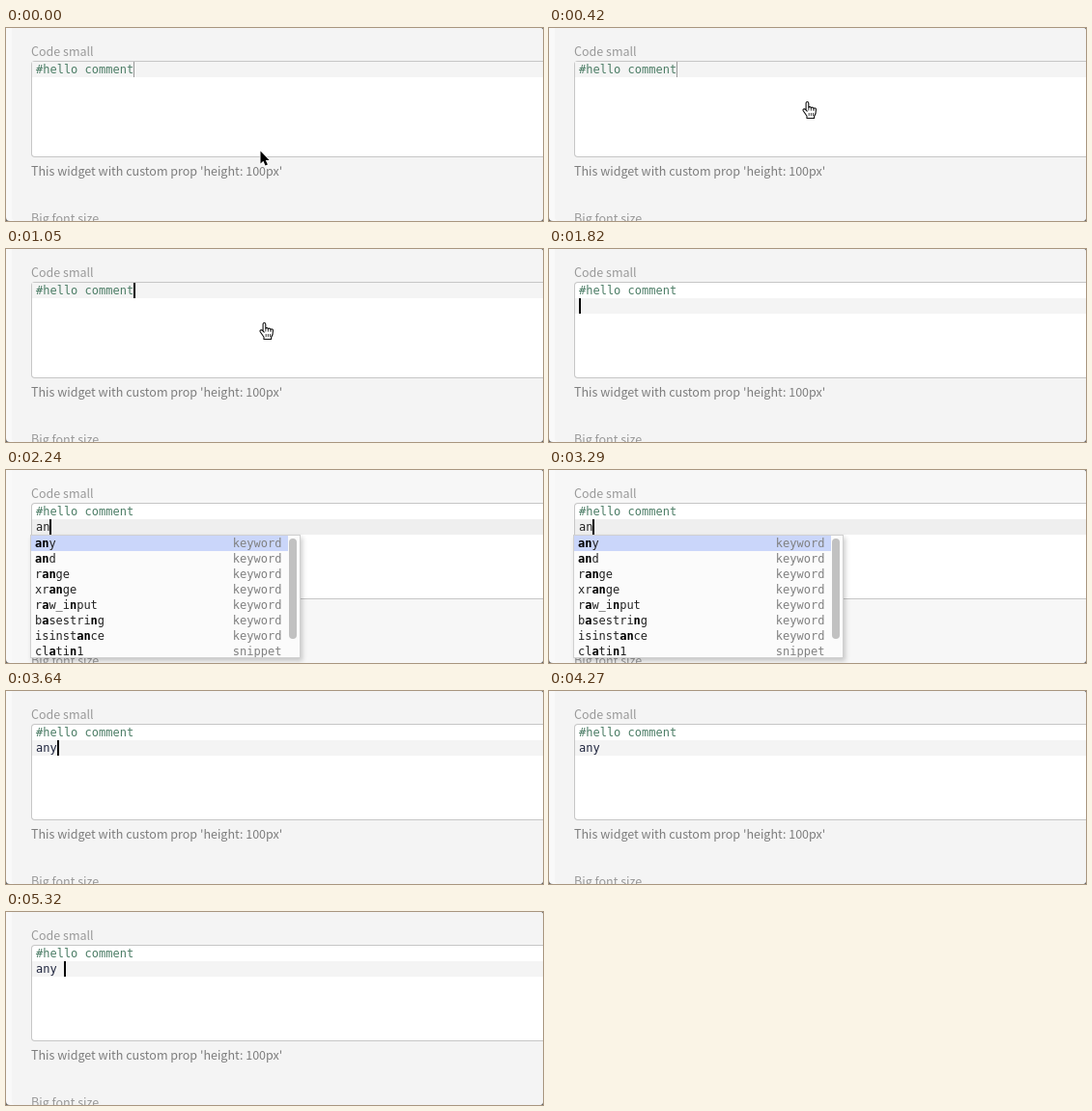
Animation, 556 px wide and 200 px high, one loop 5530 ms. Source, as an HTML page with a canvas:

```html
<!DOCTYPE html>
<html lang="en">
<head>
<meta charset="utf-8">
<title>Code editor with completion</title>
<style>
  html, body { margin: 0; width: 100%; height: 100%; overflow: hidden; background: #f4f4f4; }
  canvas { display: block; width: 556px; height: 200px; }
</style>
</head>
<body>
<canvas id="stage" width="556" height="200"></canvas>
<script>
const ctx = document.getElementById('stage').getContext('2d');
const W = 556, H = 200, LOOP = 5530, TICK = 70;
const SANS = '12.53px "Noto Sans CJK JP", "Noto Sans CJK SC", "Noto Sans CJK", "Open Sans", sans-serif';
const MONO = '12px "DejaVu Sans Mono", monospace';
const CHAR = 7.2, ROW = 16;

// Key times in ms
const CLICK = 490, ENTER = 1330, TYPE_A = 1960, TYPE_N = 2100, ACCEPT = 3640, SPACE = 4900;

const SHORT_LIST = ['as', 'abs', 'all', 'and', 'any', 'apply', 'assert', 'clatin1'];
const LONG_LIST = ['any', 'and', 'range', 'xrange', 'raw_input', 'basestring', 'isinstance', 'clatin1'];

const ARROW = new Path2D('M.5 .5V13.5L3.4 10.8L5.5 15.6L7.9 14.5L5.8 9.9H9.6Z');
const HAND = new Path2D('M5.2 10.2L3.6 8.5C2.3 7.3.4 8.2 1.2 9.7L5 15.2V17.5H12.6V15.6' +
  'C14 13.6 14.5 12 14.5 8.4C14.5 6.6 12.2 6.4 12 8C12 5.8 9.6 5.6 9.4 7.2' +
  'C9.3 5.3 7 5.2 6.8 6.6V2C6.7 0 4.1 0 4.1 2V9Z');
const KNUCKLES = new Path2D('M6.8 6.6V9.5M9.4 7.2V9.7M12 8V10M7.2 12V15M9.4 12V15M11.5 12V15');

const between = (t, a, b) => t >= a && t < b;
const mix = (a, b, k) => a + (b - a) * k;
const ease = k => k * k * (3 - 2 * k);

function box(x, y, w, h, fill) {
  ctx.fillStyle = fill;
  ctx.fillRect(x, y, w, h);
}

function rounded(x, y, w, h, r, fill) {
  ctx.beginPath();
  ctx.roundRect(x, y, w, h, r);
  ctx.fillStyle = fill;
  ctx.fill();
}

function text(str, x, y, font, fill) {
  ctx.font = font;
  ctx.fillStyle = fill;
  ctx.fillText(str, x, y);
}

function drawPage(open) {
  box(0, 0, W, H, '#666');
  rounded(0, 0, W, H, [0, 3, 4, 4], '#f9f9f9');
  rounded(6, 0, W - 6, H, [0, 3, 4, 4], open ? '#f7f7f7' : '#f4f4f4');
  text('Code small', 26, 29, SANS, '#999');
  text("This widget with custom prop 'height: 100px'", 26, 153, SANS, '#7d7d7d');
  text('Big font size', 26, 202, SANS, '#999');
}

function drawEditor(t) {
  const line = t < ENTER ? 0 : 1;
  rounded(26, 34, W, 100, 4, '#c6c6c6');
  rounded(27, 35, W, 98, 3, '#fff');
  box(27, 35 + line * ROW, W, ROW, between(t, TYPE_A, ACCEPT) ? '#efefef' : '#f4f4f4');
  text('#hello comment', 31, 47, MONO, '#4c7d66');
  const word = t < TYPE_A ? '' : t < TYPE_N ? 'a' : t < ACCEPT ? 'an' : 'any';
  text(word, 31, 63, MONO, t < ACCEPT ? '#222' : '#20263f');
}

function drawCaret(t) {
  if (t < CLICK) return box(132, 35, 1, ROW, '#999');
  const off = between(t, 1120, ENTER) || between(t, 2800, 3290) || between(t, 4270, 4690);
  if (off) return;
  const column = t < ENTER ? 14 : t < TYPE_A ? 0 : t < TYPE_N ? 1 : t < ACCEPT ? 2 : t < SPACE ? 3 : 4;
  box(Math.round(31 + column * CHAR), t < ENTER ? 35 : 51, 2, ROW, '#000');
}

// Letters of the typed prefix are bold, matched in order.
function drawItem(word, prefix, y) {
  let hit = 0;
  [...word].forEach((c, i) => {
    const match = c === prefix[hit];
    if (match) hit++;
    text(c, 30 + i * CHAR, y, (match ? 'bold ' : '') + MONO, match ? '#000' : '#222');
  });
  const kind = word === 'clatin1' ? 'snippet' : 'keyword';
  text(kind, 234.8, y, MONO, '#808080');
}

function drawPopup(t) {
  const filtered = t >= TYPE_N;
  ctx.save();
  ctx.shadowColor = 'rgba(0,0,0,.2)';
  ctx.shadowBlur = 5;
  ctx.shadowOffsetX = 2;
  ctx.shadowOffsetY = 3;
  box(25, 67, 280, 128, '#d0d0d0');
  ctx.restore();
  box(26, 68, 278, 126, '#fbfbfb');
  box(26, 68, 266, ROW, '#cad6fa');
  ctx.save();
  ctx.beginPath();
  ctx.rect(26, 68, 278, 126);
  ctx.clip();
  (filtered ? LONG_LIST : SHORT_LIST).forEach((word, i) =>
    drawItem(word, filtered ? 'an' : 'a', 80 + i * ROW));
  ctx.restore();
  rounded(293, 71, 8, filtered ? 104 : 36, 4, '#c1c1c1');
}

function drawPointer(x, y, hand) {
  ctx.save();
  ctx.translate(x, y);
  ctx.lineJoin = 'round';
  if (hand) {
    ctx.fillStyle = '#fff';
    ctx.strokeStyle = '#111';
    ctx.lineWidth = 1.1;
    ctx.fill(HAND);
    ctx.stroke(HAND);
    ctx.lineWidth = .8;
    ctx.stroke(KNUCKLES);
  } else {
    ctx.strokeStyle = '#fff';
    ctx.lineWidth = 1.6;
    ctx.stroke(ARROW);
    ctx.fillStyle = '#000';
    ctx.fill(ARROW);
  }
  ctx.restore();
}

function drawMouse(t) {
  if (t < ENTER) {
    const k = ease(Math.min(t / 420, 1));
    const y = mix(127, 76, k);
    drawPointer(mix(263, 262, k), y, y < 118);
  } else if (between(t, 5040, 5320)) {
    const k = (t - 5040) / 210;
    const y = mix(87, 180, k);
    drawPointer(mix(272, 319, k), y, y < 122);
  }
}

function draw(now) {
  const t = Math.floor((now % LOOP) / TICK) * TICK;
  const open = between(t, TYPE_A, ACCEPT);
  drawPage(open);
  drawEditor(t);
  drawCaret(t);
  if (open) drawPopup(t);
  drawMouse(t);
}

const start = performance.now();
function frame() {
  draw(performance.now() - start);
  requestAnimationFrame(frame);
}
frame();
</script>
</body>
</html>
```
